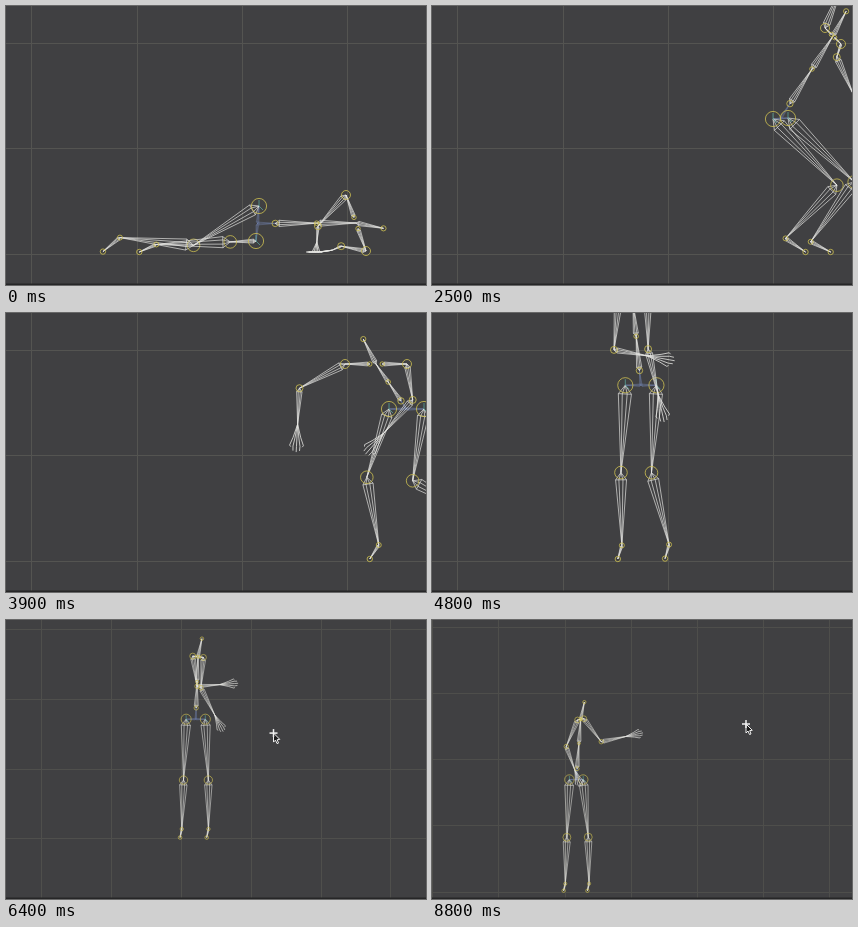
Recreate the animation shown at these times as an HTML page with a canvas. Size 420x279 px, loop 8900 ms.

```html
<!DOCTYPE html>
<html lang="en">
<head>
<meta charset="utf-8">
<title>Armature viewport</title>
<style>
html, body { margin: 0; width: 100%; height: 100%; overflow: hidden; background: #404042; }
canvas { display: block; width: 100%; height: 100%; }
</style>
</head>
<body>
<canvas width="420" height="279"></canvas>
<script>
const ctx = document.querySelector('canvas').getContext('2d');
const W = 420, H = 279, LOOP = 8900, STEP = 100;
const GROUND = 248;
const BASE = { x: 131, y: GROUND, unit: 105.4 };
const LENGTH = { thigh: 92, shin: 74, upperArm: 46, forearm: 40, hand: 28, head: 28 };

// Angles are in degrees: 0 hangs down, 90 points right.
// The last two values foreshorten a bone that leaves the picture plane.
const limb = (upper, lower, upperScale = 1, lowerScale = 1) => [upper, lower, upperScale, lowerScale];

// hip and shoulder are offsets from the pelvis and chest to side A; side B mirrors them.
const prone = {
  pelvis: [251.5, 217.5], hip: [1.5, -17.5], chest: [350, 217], shoulder: [-10, -28],
  head: [79], facing: [-0.85],
  legA: limb(-59, -96, 0.83), legB: limb(-88, -88, 0.28),
  armA: limb(-42, -4, 0.91, 0.4), armB: limb(-101, -66, 0.55, 0.25)
};
const crouch = {
  pelvis: [134, 191], hip: [-16, 4], chest: [94, 135], shoulder: [-31, 1],
  head: [193], facing: [-0.8],
  legA: limb(-71, 71, 0.61, 0.67), legB: limb(-97, 43, 0.27, 0.91),
  armA: limb(-47, -71, 0.83), armB: limb(33, 24, 1.16)
};
const stride = {
  pelvis: [348.5, 112.5], hip: [-7.5, 0.5], chest: [401, 30], shoulder: [-8, -8],
  head: [152], facing: [1],
  legA: limb(44, -44), legB: limb(46, -36),
  armA: limb(-202, -220), armB: limb(-18, 24, 0.3)
};
const reach = {
  pelvis: [400.5, 96], hip: [-17.5, 0], chest: [370, 51], shoulder: [-31, 0],
  head: [207], facing: [-0.45],
  legA: limb(-18, 10, 0.78, 0.93), legB: limb(-9, 61, 0.79),
  armA: limb(-62, -3, 1.12, 0.9), armB: limb(9, -41, 0.79, 1.1)
};
const stand = {
  pelvis: [153, 67], hip: [-15, 0], chest: [156, -27], shoulder: [-10, -1],
  head: [168], facing: [-0.13],
  legA: limb(-2.5, -2), legB: limb(2.5, 0),
  armA: limb(4, 93, 1, 0.83), armB: limb(-2, 28, 1, 1.18)
};
const turned = {
  ...stand, pelvis: [149, 69], hip: [-11, 0], shoulder: [5, -1],
  legB: limb(5, 1), armA: limb(37, 102), armB: limb(-23, 20)
};

const poseKeys = [[0, prone], [1300, crouch], [2500, stride], [3900, reach],
  [5200, stand], [5700, stand], [8800, turned]];
const far = { x: 215, y: 193, unit: 38.2 };
const cameraKeys = [[5750, BASE], [7000, far], [7300, far], [8700, { x: 133, y: 272, unit: 66.2 }]];
const cursorKeys = [[5700, { x: 261, y: 120 }], [7300, { x: 277, y: 103 }], [8700, { x: 314, y: 104 }]];

const mix = (a, b, u) => a + (b - a) * u;
const clamp01 = u => Math.min(1, Math.max(0, u));
const between = (p, q, u) => [mix(p[0], q[0], u), mix(p[1], q[1], u)];
const shift = (p, d, k = 1) => [p[0] + d[0] * k, p[1] + d[1] * k];
const grounded = p => [p[0], Math.min(p[1], GROUND - 2)];

function polar(p, degrees, length) {
  const a = degrees * Math.PI / 180;
  return [p[0] + Math.sin(a) * length, p[1] + Math.cos(a) * length];
}

function span(keys, t) {
  let i = 0;
  while (i < keys.length - 2 && t >= keys[i + 1][0]) i++;
  return { i, u: clamp01((t - keys[i][0]) / (keys[i + 1][0] - keys[i][0])) };
}

function eased(keys, t) {
  const { i, u } = span(keys, t), e = u * u * (3 - 2 * u);
  const from = keys[i][1], to = keys[i + 1][1], out = {};
  for (const name in from) out[name] = mix(from[name], to[name], e);
  return out;
}

// Cubic through the keys that rests wherever a value turns around.
function curve(keys, i, u, value) {
  const slope = k => (value(keys[k + 1][1]) - value(keys[k][1])) / (keys[k + 1][0] - keys[k][0]);
  const tangent = k => {
    if (k === 0 || k === keys.length - 1) return 0;
    const a = slope(k - 1), b = slope(k);
    return a * b > 0 ? 2 * a * b / (a + b) : 0;
  };
  const dt = keys[i + 1][0] - keys[i][0], v = 1 - u;
  return value(keys[i][1]) * v * v * (1 + 2 * u) + value(keys[i + 1][1]) * u * u * (3 - 2 * u)
    + dt * u * v * (v * tangent(i) - u * tangent(i + 1));
}

function poseAt(t) {
  const { i, u } = span(poseKeys, t), pose = {};
  for (const part in stand) {
    pose[part] = stand[part].map((_, n) => curve(poseKeys, i, u, p => p[part][n]));
  }
  const walk = clamp01((t - 3900) / 1300);
  const swing = 16 * Math.sin(Math.PI * walk) * Math.sin(3 * Math.PI * walk);
  pose.legA[0] += swing;
  pose.legB[0] -= swing;
  return pose;
}

function line(...points) {
  ctx.beginPath();
  points.forEach(p => ctx.lineTo(p[0], p[1]));
  ctx.stroke();
}

function ring(p, r, color = '#cfc052') {
  ctx.strokeStyle = color;
  ctx.beginPath();
  ctx.arc(p[0], p[1], r, 0, 7);
  ctx.stroke();
}

function bone(a, b, color = 'rgba(232,232,228,.85)') {
  const dx = b[0] - a[0], dy = b[1] - a[1];
  ctx.strokeStyle = color;
  const corners = [-1, -0.35, 0.4, 1].map(side => {
    const w = 0.075 * side;
    return [a[0] + dx * 0.1 - dy * w, a[1] + dy * 0.1 + dx * w];
  });
  corners.forEach(c => line(a, c, b));
  line(corners[0], corners[3]);
}

function drawHand(wrist, degrees) {
  ctx.strokeStyle = '#e8e8e4';
  for (let finger = -2; finger <= 2; finger++) {
    const joint = (along, spread) =>
      grounded(polar(wrist, degrees + finger * spread, LENGTH.hand * along));
    line(wrist, joint(0.5, 8), joint(0.8, 9), joint(1 - 0.04 * finger * finger, 7));
  }
}

function drawLeg(hip, [thigh, shin, thighScale, shinScale], facing) {
  const knee = polar(hip, thigh, LENGTH.thigh * thighScale);
  const ankle = polar(knee, shin, LENGTH.shin * shinScale);
  const toe = grounded(shift(ankle, [20 * facing, 14]));
  bone(hip, knee);
  bone(knee, ankle);
  bone(ankle, toe);
  ctx.strokeStyle = '#58a39a';
  line(shift(hip, [0, -6]), hip, shift(hip, [4, 4]));
  ring(hip, 7.6);
  ring(knee, 6.3);
  ring(ankle, 2.5);
  ring(toe, 2.7);
}

function drawArm(chest, shoulder, [upper, lower, upperScale, lowerScale]) {
  const collar = between(chest, shoulder, 0.2);
  const elbow = polar(shoulder, upper, LENGTH.upperArm * upperScale);
  const wrist = polar(elbow, lower, LENGTH.forearm * lowerScale);
  bone(collar, shoulder);
  bone(shoulder, elbow);
  bone(elbow, wrist);
  drawHand(wrist, lower);
  ring(collar, 2.2);
  ring(shoulder, 4.5);
  ring(elbow, 3.5);
}

function drawFigure({ pelvis, hip, chest, shoulder, head, facing, legA, legB, armA, armB }) {
  const waist = between(pelvis, chest, 0.18), back = between(pelvis, chest, 0.6);
  const crown = polar(chest, head[0], LENGTH.head);
  const hipA = shift(pelvis, hip), hipB = shift(pelvis, hip, -1);
  [hipA, hipB, waist].forEach(p => bone(pelvis, p, 'rgba(116,132,178,.45)'));
  bone(waist, back);
  bone(back, chest);
  bone(chest, crown);
  drawLeg(hipA, legA, facing[0]);
  drawLeg(hipB, legB, facing[0]);
  drawArm(chest, shift(chest, shoulder), armA);
  drawArm(chest, shift(chest, shoulder, -1), armB);
  ring(waist, 3.2);
  ring(back, 2.3);
  ring(crown, 2.6);
}

function drawGrid({ x, y, unit }) {
  const light = Math.round(mix(74, 84, clamp01((unit - 38) / 67)));
  const crisp = v => Math.floor(v) + 0.5;
  ctx.strokeStyle = `rgb(${light},${light},${light - 3})`;
  ctx.lineWidth = 1;
  for (let gx = x % unit; gx < W; gx += unit) line([crisp(gx), 0], [crisp(gx), H]);
  for (let gy = y % unit; gy < H; gy += unit) line([0, crisp(gy)], [W, crisp(gy)]);
}

function drawCursor({ x, y }, zooming) {
  ctx.lineWidth = 1;
  ctx.strokeStyle = '#f0f0f0';
  ctx.fillStyle = '#1c1c1c';
  ctx.beginPath();
  [[0, 0], [0, 9], [2, 7], [3.5, 10.5], [5, 10], [3.7, 6.6], [6.3, 6.3]]
    .forEach(([dx, dy]) => ctx.lineTo(x + dx, y + dy));
  ctx.closePath();
  ctx.fill();
  ctx.stroke();
  if (zooming) {
    ctx.lineWidth = 1.5;
    line([x - 4, y], [x + 4, y]);
    line([x, y - 4], [x, y + 4]);
  }
}

function draw(t) {
  const camera = eased(cameraKeys, t), k = camera.unit / BASE.unit;
  ctx.setTransform(1, 0, 0, 1, 0, 0);
  ctx.fillStyle = '#404042';
  ctx.fillRect(0, 0, W, H);
  drawGrid(camera);
  ctx.setTransform(k, 0, 0, k, camera.x - BASE.x * k, camera.y - BASE.y * k);
  ctx.lineWidth = 0.8 / Math.sqrt(k);
  drawFigure(poseAt(t));
  ctx.setTransform(1, 0, 0, 1, 0, 0);
  if (t >= 5400) drawCursor(eased(cursorKeys, t), t > 5750);
  ctx.fillStyle = '#262627';
  ctx.fillRect(0, H - 1.5, W, 1.5);
}

const start = performance.now();
function tick() {
  const t = (performance.now() - start) % LOOP;
  draw(Math.floor(t / STEP) * STEP);
  requestAnimationFrame(tick);
}
tick();
</script>
</body>
</html>
```
